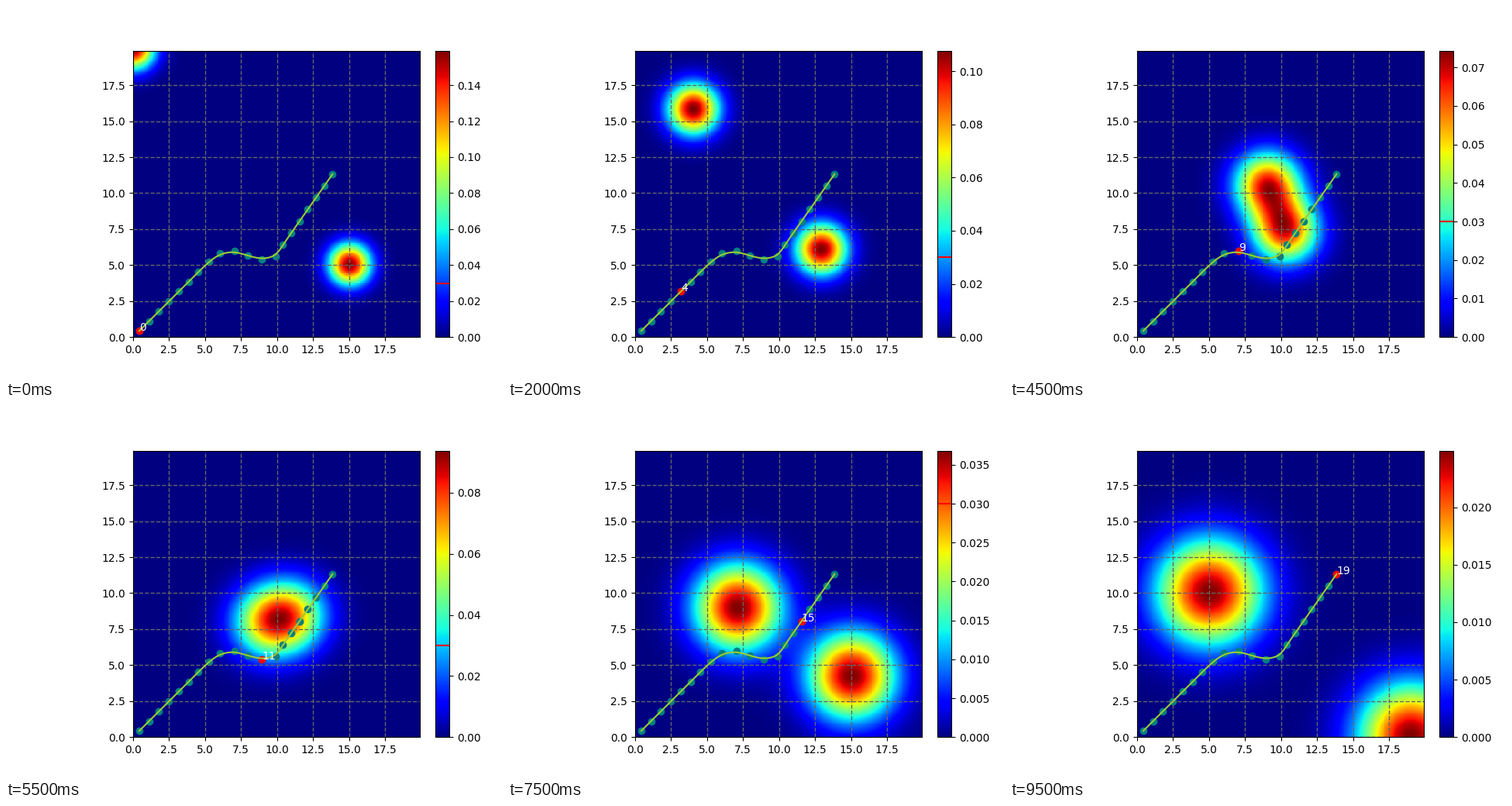
Write a matplotlib script that moves like this. It is 640 px wide and 480 px high and loops after 10 s.

```python
import numpy as np
import matplotlib.pyplot as plt
from matplotlib.animation import FuncAnimation

WIDTH, HEIGHT, DPI = 640, 480, 100
STEPS = 20
THRESHOLD = 0.03


def line_points(start, step, count):
    return np.array(start) + np.outer(np.arange(count), step)


def spline(control, samples=12):
    """Uniform cubic B-spline that starts and ends on the outer control points."""
    first = 2 * control[0] - control[1]
    last = 2 * control[-1] - control[-2]
    p = np.vstack([first, control, last])
    t = np.linspace(0, 1, samples)[:, None]
    basis = [(1 - t) ** 3,
             3 * t ** 3 - 6 * t ** 2 + 4,
             -3 * t ** 3 + 3 * t ** 2 + 3 * t + 1,
             t ** 3]
    return np.vstack([sum(b * p[i + j] for j, b in enumerate(basis)) / 6
                      for i in range(len(p) - 3)])


waypoints = np.vstack([
    line_points((0.43, 0.43), (0.685, 0.683), 7),
    [(5.27, 5.23), (6.04, 5.80), (7.05, 5.97),
     (7.98, 5.65), (8.95, 5.40), (9.92, 5.60)],
    line_points((10.42, 6.42), (0.573, 0.817), 7),
])

grid = np.arange(200) * 0.1
gx, gy = np.meshgrid(grid[:-1], grid[:-1])


def gaussian(x, y, sigma):
    var = sigma ** 2
    return np.exp(-((gx - x) ** 2 + (gy - y) ** 2) / (2 * var)) / (2 * np.pi * var)


def density(step):
    u = step / (STEPS - 1)
    sigma = 1.05 ** step
    return (gaussian(19 * u, 20 - 20 * u, sigma)
            + gaussian(15 - 10 * u, 5 + 5 * u, sigma))


def pixel_axes(left, bottom, width, height):
    return fig.add_axes([left / WIDTH, bottom / HEIGHT, width / WIDTH, height / HEIGHT])


fig = plt.figure(figsize=(WIDTH / DPI, HEIGHT / DPI), dpi=DPI)
ax = pixel_axes(163.96, 52.8, 369.6, 369.6)
cax = pixel_axes(553.56, 52.8, 18.48, 369.6)

mesh = ax.pcolormesh(grid, grid, density(0), cmap="jet", vmin=0, shading="flat")
colorbar = fig.colorbar(mesh, cax=cax)
cax.axhline(THRESHOLD, color="red")
ax.grid(True, color="#666666", linestyle="--", linewidth=1)

ax.scatter(*waypoints.T, color="teal")
current = ax.scatter(*waypoints[0], color="red")
ax.plot(*spline(waypoints).T, color="yellowgreen")
label = ax.text(*waypoints[0], "0", color="white")
ax.set(xlim=(0, 19.9), ylim=(0, 19.9))


def update(step):
    values = density(step)
    mesh.set_array(values)
    mesh.set_clim(0, values.max())
    current.set_offsets([waypoints[step]])
    label.set_position(waypoints[step])
    label.set_text(str(step))
    return mesh, current, label


anim = FuncAnimation(fig, update, frames=STEPS, interval=500, repeat=True, repeat_delay=0)
plt.show()
```
